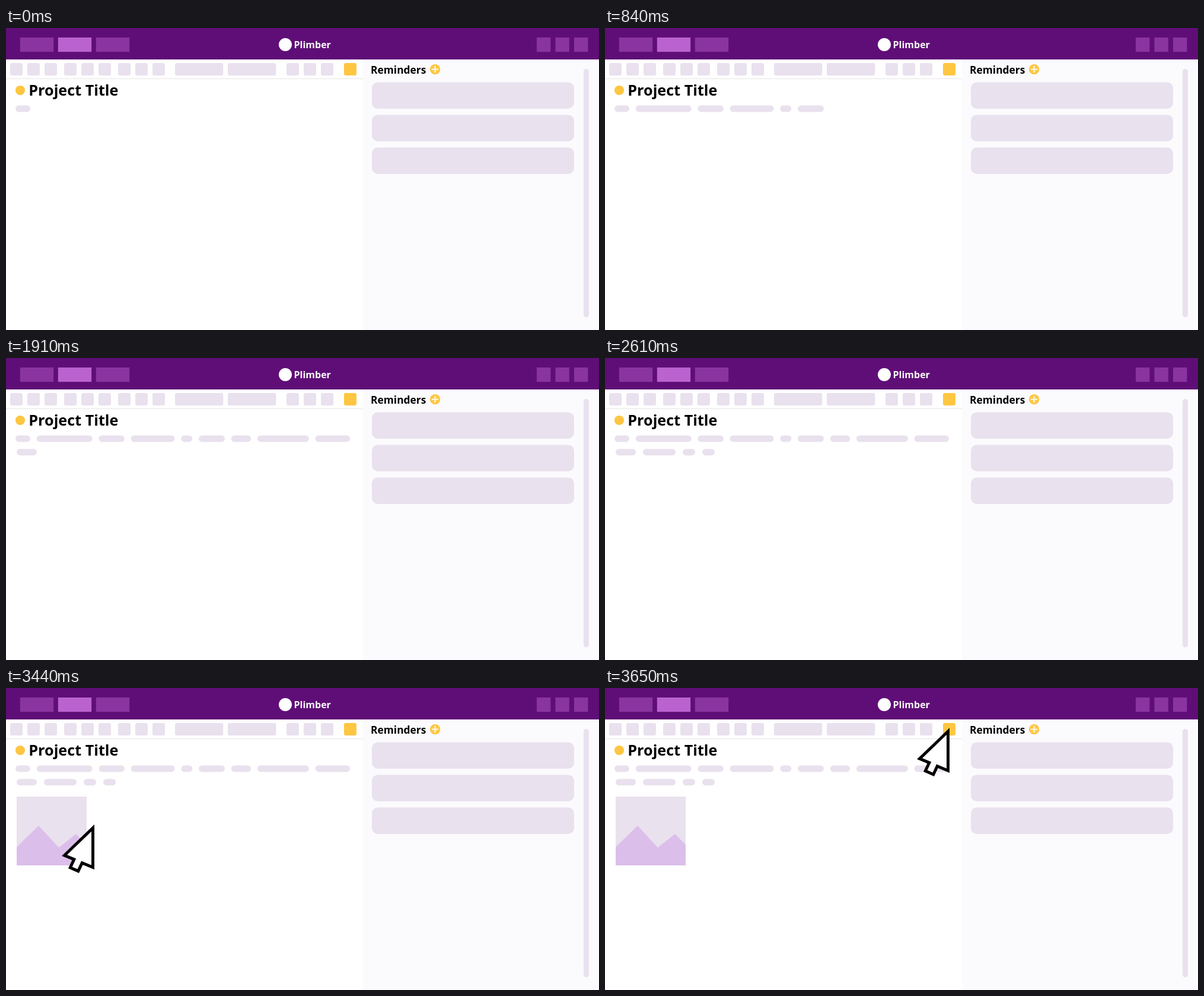
These frames come from a looping animation (1000x509 px, 3980 ms). An HTML page:

```html
<!DOCTYPE html>
<html lang="en">
<head>
<meta charset="utf-8">
<title>Project editor</title>
<style>
  html, body { margin: 0; width: 100%; height: 100%; overflow: hidden; background: #fff; }
  svg { display: block; width: 100vw; height: 100vh; }
  text { font-family: "Open Sans", "Noto Sans", sans-serif; font-weight: 700; }
</style>
</head>
<body>
<svg id="stage" viewBox="0 0 1000 509"></svg>
<script>
const NS = 'http://www.w3.org/2000/svg';
const stage = document.getElementById('stage');
const LOOP = 3980;
const PICTURE_AT = 2880, CURSOR_AT = 3380, HOP = 30, HOPS = 9;
const LILAC = '#e9e1ee', AMBER = '#fec641', TAB = '#8934a0';

function add(tag, attrs, parent = stage) {
  const el = document.createElementNS(NS, tag);
  for (const key in attrs) el.setAttribute(key, attrs[key]);
  return parent.appendChild(el);
}
const rect = (x, y, width, height, fill, rx = 0, parent) =>
  add('rect', { x, y, width, height, fill, rx }, parent);
const circle = (cx, cy, r, fill) => add('circle', { cx, cy, r, fill });
function label(x, y, size, text, fill = '#000') {
  add('text', { x, y, 'font-size': size, fill }).textContent = text;
}
// Calls place(position, index) for three evenly spaced items
function three(first, step, place) {
  for (let i = 0; i < 3; i++) place(first + i * step, i);
}

// Panels and header
rect(602, 53, 398, 456, '#fbfafd');
rect(0, 85, 602, 1, '#e6e5e7');
rect(0, 0, 1000, 53, '#5f0e77');
three(23.8, 64, (x, i) => rect(x, 16, 56.4, 24.2, i === 1 ? '#ba62cf' : TAB));
three(895, 31.5, x => rect(x, 16, 23.4, 24.2, TAB));
circle(471, 28, 11, '#fff');
label(485.5, 34, 16, 'Plimber', '#fff');

// Toolbar
const tool = (x, width = 21, fill = LILAC) => rect(x, 59, width, 21, fill, 3);
three(7, 91, group => three(group, 29, x => tool(x)));
tool(285, 81.3);
tool(374, 81.3);
three(473, 29, x => tool(x));
tool(570, 21, AMBER);

// Headings
circle(24, 105, 8.1, AMBER);
label(38.3, 114, 25.2, 'Project Title');
label(615, 77, 17.4, 'Reminders');
circle(723.6, 69.6, 8.7, AMBER);
add('path', { d: 'M718 69.6h11.2M723.6 64v11.2', stroke: '#fff6df', 'stroke-width': 2.4 });

// Reminder cards and scrollbar
three(91.4, 55, y => rect(617, y, 341, 44.6, LILAC, 10));
rect(974, 69, 9, 418.5, LILAC, 4.5);

const timed = [];

// Lays words [width, time of appearance] side by side
function line(x, y, gap, words) {
  for (const [width, at] of words) {
    timed.push({ at, el: rect(x, y, width, 11, LILAC, 5.5) });
    x += width + gap;
  }
}
line(16, 130.4, 10.7, [
  [25, 0], [94, 170], [43.5, 470], [74, 570], [19, 670],
  [44, 840], [33.5, 1210], [87, 1410], [58.5, 1710]
]);
line(18, 153.2, 12, [[34, 1910], [55, 2010], [21, 2180], [21, 2610]]);

const picture = add('g', {});
rect(18, 183, 118, 116, LILAC, 0, picture);
add('path', { d: 'M18 268L55 232L89 269L118 246L136 264V299H18Z', fill: '#dbbfea' }, picture);
timed.push({ at: PICTURE_AT, el: picture });

const cursor = add('path', {
  d: 'M-2.5 6V72.3L-20.7 64.8L-27.2 78.7L-40.7 72.8L-34.2 58.9L-50.5 52.1Z',
  fill: '#fff', stroke: '#000', 'stroke-width': 5, 'stroke-miterlimit': 10
});
timed.push({ at: CURSOR_AT, el: cursor });

const mix = (a, b, p) => a + (b - a) * p;

function draw(t) {
  for (const { at, el } of timed) el.setAttribute('visibility', t >= at ? 'visible' : 'hidden');
  // The cursor crosses in equal hops along a straight line
  const hop = Math.floor((t - CURSOR_AT) / HOP);
  const p = Math.max(0, Math.min(HOPS, hop)) / HOPS;
  cursor.setAttribute('transform', `translate(${mix(25.6, 581, p)} ${mix(276.5, 67, p)})`);
}

const start = performance.now();
function tick() {
  draw((performance.now() - start) % LOOP);
  requestAnimationFrame(tick);
}
draw(0);
requestAnimationFrame(tick);
</script>
</body>
</html>
```
